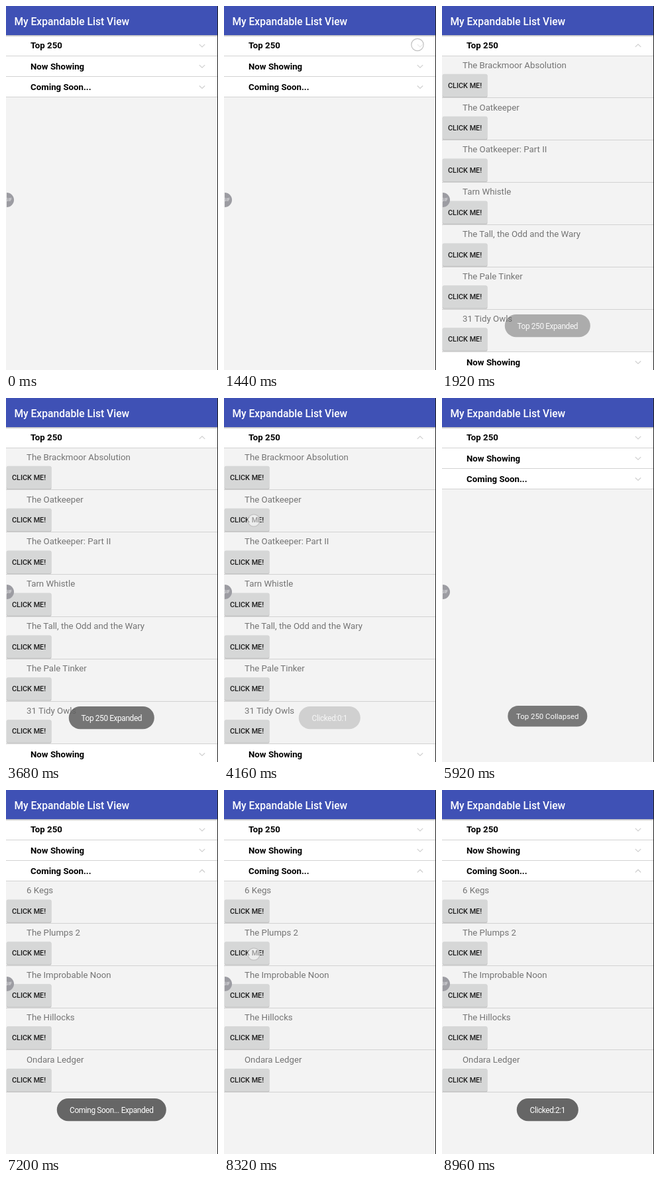
Animation of 320 by 550 pixels, one loop 9.6 s. Source, as an HTML page:

```html
<!DOCTYPE html>
<html lang="en">
<head>
<meta charset="utf-8">
<title>Expandable list</title>
<style>
  html, body { margin: 0; width: 100%; height: 100%; overflow: hidden; background: #f3f3f3; }
  svg { display: block; width: 320px; height: 550px; font-family: Roboto, sans-serif; }
  .title { font-size: 15.62px; font-weight: 500; fill: #fff; }
  .group { font-size: 13.25px; font-weight: 700; fill: #000; }
  .child { font-size: 13.25px; fill: #747474; }
  .button { font-size: 10.85px; font-weight: 500; fill: #1c1c1c; }
  .toast { font-size: 11.9px; letter-spacing: -.4px; fill: #fff; text-anchor: middle; }
  .toast.compact { font-size: 11.4px; letter-spacing: 0; }
  .chevron { fill: none; stroke: #d0d0d0; stroke-width: 1.2; }
  .divider { fill: #d2d2d2; }
</style>
</head>
<body>
<svg viewBox="0 0 320 550">
  <defs>
    <linearGradient id="shade" x2="0" y2="1">
      <stop stop-color="#000" stop-opacity=".28"/>
      <stop offset="1" stop-color="#000" stop-opacity="0"/>
    </linearGradient>
  </defs>
  <rect width="320" height="550" fill="#f3f3f3"/>
  <g id="list"></g>
  <rect width="320" height="44" fill="#3f51b5"/>
  <rect y="44" width="320" height="3" fill="url(#shade)"/>
  <text class="title" x="12.4" y="28.5">My Expandable List View</text>
  <path d="M1 282A11 11 0 0 1 1 304Z" fill="#9c9ca2"/>
  <text x="-1" y="295.4" font-size="6.6" fill="#f0f0f2">GIF</text>
  <g id="toasts"></g>
  <circle id="cursor" r="9.2" fill="#fff" fill-opacity=".55" stroke="#c2c2c2" stroke-width="1.2"/>
  <rect x="319" width="1" height="550" fill="#1c1c1c"/>
</svg>
<script>
const LOOP = 9600, STEP = 160;
const LIST_TOP = 44, GROUP_H = 31.3, CHILD_H = 63.9;
const TOAST_X = 159.3;

const groups = [
  { name: 'Top 250', children: [
    'The Brackmoor Absolution', 'The Oatkeeper', 'The Oatkeeper: Part II', 'Tarn Whistle',
    'The Tall, the Odd and the Wary', 'The Pale Tinker', '31 Tidy Owls'] },
  { name: 'Now Showing', children: [] },
  { name: 'Coming Soon...', children: [
    '6 Kegs', 'The Plumps 2', 'The Improbable Noon', 'The Hillocks', 'Ondara Ledger'] }
];

const toasts = [
  { label: 'Top 250 Expanded', width: 129, fadeIn: [1600, 2240], fadeOut: [3640, 4000] },
  { label: 'Clicked:0:1', width: 93, fadeIn: [4000, 4640], fadeOut: [5280, 5600] },
  { label: 'Top 250 Collapsed', width: 120, compact: true, fadeIn: [5600, 5970], fadeOut: [6400, 6720] },
  { label: 'Coming Soon... Expanded', width: 165, fadeIn: [6720, 7200], fadeOut: [7920, 8320] },
  { label: 'Clicked:2:1', width: 93, fadeIn: [8320, 8960], fadeOut: [9600, 9700] }
];

const touches = [
  { from: 640, to: 1600, x: 292, y: 58.5 },
  { from: 3840, to: 4320, x: 45, y: 185 },
  { from: 5280, to: 5440, x: 270.5, y: 62 },
  { from: 5440, to: 5600, x: 288, y: 60 },
  { from: 6400, to: 6720, x: 292, y: 122 },
  { from: 8160, to: 8640, x: 45, y: 248 }
];

const byId = id => document.getElementById(id);
const list = byId('list'), toastLayer = byId('toasts'), cursor = byId('cursor');
const progress = (t, [a, b]) => Math.min(1, Math.max(0, (t - a) / (b - a)));
const between = (t, a, b) => t >= a && t < b;
const divider = y => `<rect class="divider" y="${y}" width="320" height="1"/>`;

function groupRow(name, y, open) {
  const mid = y + GROUP_H / 2 + .2, dip = open ? -2 : 2;
  return `<rect y="${Math.ceil(y)}" width="320" height="${GROUP_H - .3}" fill="#fff"/>
    <text class="group" x="37" y="${mid + 4.6}">${name}</text>
    <path class="chevron" d="M291.8 ${mid - dip}L296 ${mid + dip}L300.2 ${mid - dip}"/>
    ${divider(Math.floor(y + GROUP_H))}`;
}

function childRow(name, y) {
  return `<text class="child" x="31" y="${y + 18.3}">${name}</text>
    ${divider(Math.round(y + CHILD_H) - 1)}
    <rect x=".7" y="${y + 28}" width="67.8" height="35" rx="2" fill="#c3c3c3"/>
    <rect x="1" y="${y + 27.5}" width="67" height="34.3" rx="2" fill="#d6d7d7"/>
    <text class="button" x="9" y="${y + 48.6}">CLICK ME!</text>`;
}

function listMarkup(openIndex) {
  let y = LIST_TOP, markup = '';
  groups.forEach((group, i) => {
    const open = i === openIndex;
    markup += groupRow(group.name, y, open);
    y += GROUP_H;
    if (!open) return;
    for (const child of group.children) {
      markup += childRow(child, y);
      y += CHILD_H;
    }
  });
  return markup;
}

function toastMarkup({ label, width, compact }) {
  const top = compact ? 465 : 466, height = compact ? 31.5 : 34.3;
  return `<g>
    <rect x="${TOAST_X - width / 2}" y="${top}" width="${width}" height="${height}"
      rx="${height / 2}" fill="#626262" fill-opacity=".97"/>
    <text class="toast ${compact ? 'compact' : ''}" x="${TOAST_X}" y="${top + height / 2 + 4.4}">${label}</text>
  </g>`;
}
toastLayer.innerHTML = toasts.map(toastMarkup).join('');

let shown = null;
function render(time) {
  const t = Math.floor(time % LOOP / STEP) * STEP;
  const open = between(t, 1600, 5600) ? 0 : t >= 6720 ? 2 : -1;
  if (open !== shown) list.innerHTML = listMarkup(shown = open);

  toasts.forEach(({ fadeIn, fadeOut }, i) => {
    toastLayer.children[i].setAttribute('opacity', progress(t, fadeIn) * (1 - progress(t, fadeOut)));
  });

  const touch = touches.find(({ from, to }) => between(t, from, to));
  cursor.setAttribute('visibility', touch ? 'visible' : 'hidden');
  if (touch) cursor.setAttribute('transform', `translate(${touch.x} ${touch.y})`);
}

const start = performance.now();
function tick() {
  render(performance.now() - start);
  requestAnimationFrame(tick);
}
tick();
</script>
</body>
</html>
```
